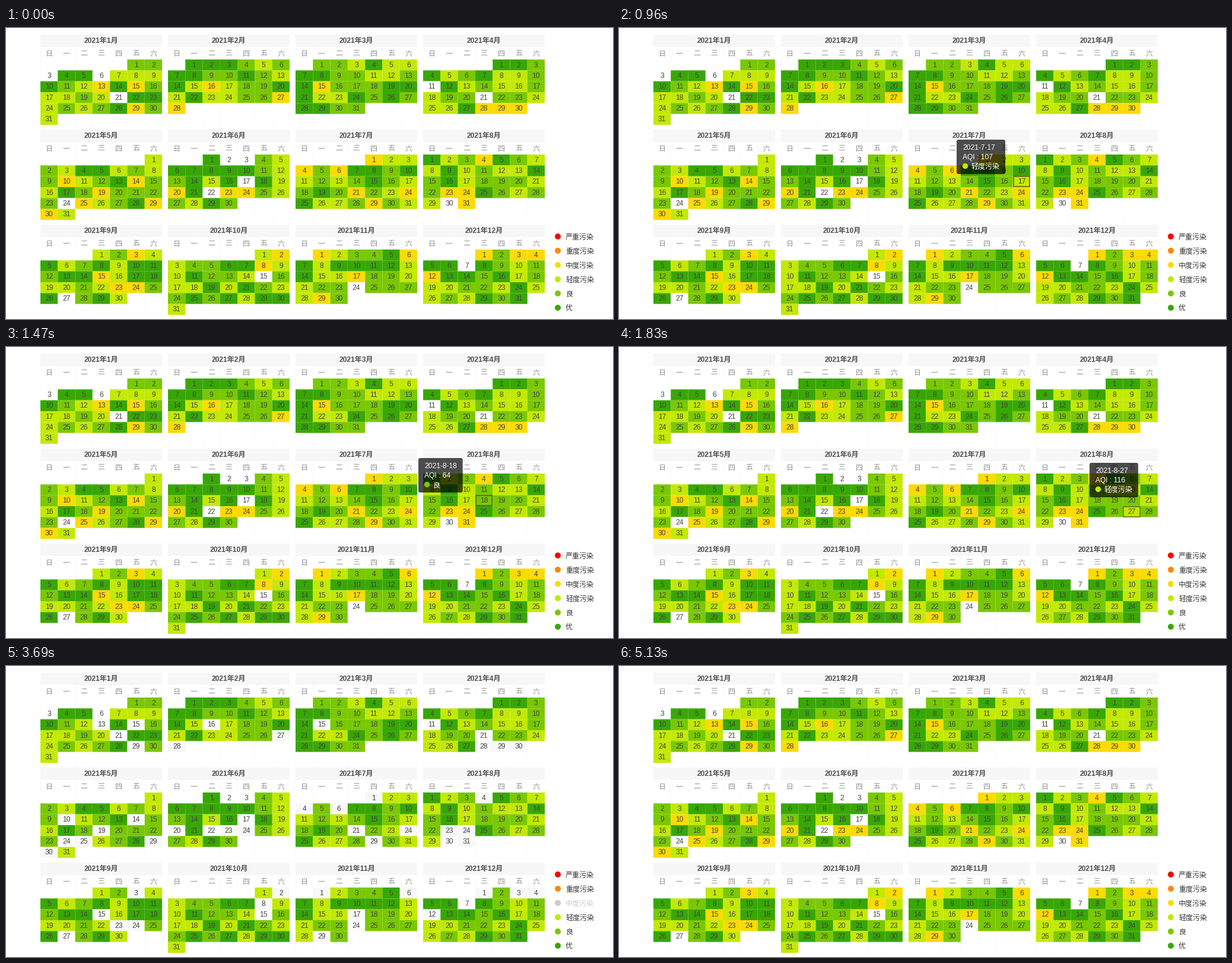
Write a matplotlib script that moves like this. It is 1023 by 490 pixels and loops after 5.76 s.

```python
import numpy as np
import matplotlib.pyplot as plt
from matplotlib.animation import FuncAnimation
from matplotlib.patches import Circle, FancyBboxPatch, Rectangle

W, H, DPI = 1023, 490, 64
STEP, LOOP = 30, 5760
PX = 72 / DPI  # points per pixel
CELL_W, CELL_H = 205 / 7, 110 / 6

plt.rcParams["font.family"] = ["Liberation Sans", "Noto Sans CJK JP"]

# grade letter -> (name, colour, lowest index), worst first
GRADES = {
    "S": ("严重污染", "#fc0003", 301),
    "H": ("重度污染", "#ff8800", 201),
    "M": ("中度污染", "#fbdb00", 151),
    "L": ("轻度污染", "#c3e900", 102),
    "G": ("良", "#79c800", 54),
    "E": ("优", "#38a703", 22),
}
NO_DATA, OFF_CELL, OFF_MARK = "#ffffff", "#f8f8f8", "#cccccc"

# daily grades of the year, one word per calendar week, "-" where no reading
MONTHS = [
    "GG -EE-LLL EGLMEMG LLGL-EE LGLGEMG L",
    "EEEGLG EEGGEGL ELMLGGE LELLGGM M",
    "GGLELL EEGGLLG EMGGGEE ELLEGEG EEGG",
    "EEG ELGELLG -ELGLLG LGG-GGL LLEMMM",
    "L GLEELGL GMLGEMG LEGMGGG G-MLGEM ML",
    "E--GL EEEEEGL GELE-EL ME-MMGL GLEG",
    "MLL MGMEEGE LGLGEGL GEGMGLM ELLGMGL",
    "ELGMEGL LELGLLE GELGGGL GMMEGLG L-M",
    "LGML ELGELEE GEEMLEE LLGLMMG E-GEL",
    "LM LGGEEML LEGGL-G LLELEGL GEGELEE L",
    "MLGGEM ELEEEEL ELLMGGL LGG-GGG LMG",
    "MGMM EE-EGLG MEEGELG LLGGLEL LGLEGE",
]
DAYS = [m.replace(" ", "") for m in MONTHS]
FIRST = [(5 + sum(len(d) for d in DAYS[:m])) % 7 for m in range(12)]

# pointer key points: ms, x, y
POINTER = np.array([
    (150, 620, 240), (210, 678, 240), (360, 678, 277), (450, 678, 277),
    (510, 864, 277), (570, 561, 259), (870, 561, 259), (960, 678, 259),
    (1200, 678, 259), (1470, 793, 259), (1650, 835, 259), (1830, 864, 277),
])
HOVER_START, HOVER_END = 150, 1860
FOLLOW = 0.15  # share of the way the tooltip covers per step
READINGS = {"2021-7-24": 151, "2021-7-17": 107, "2021-8-18": 64}
# legend switches: (start ms, end ms, grade)
SWITCHED = [(2730, 3150, "H"), (3690, 4200, "M"), (4620, 5130, "L")]

fig = plt.figure(figsize=(W / DPI, H / DPI), dpi=DPI, facecolor="white")
ax = fig.add_axes([0, 0, 1, 1], zorder=1)


def reset_axes():
    ax.clear()
    ax.set(xlim=(0, W), ylim=(H, 0))
    ax.axis("off")


def label(x, y, s, color="#444444", size=12, **kw):
    return ax.text(x, y, s, color=color, fontsize=size * PX, va="baseline", **kw)


def box(x, y, w, h, color, **kw):
    return ax.add_patch(Rectangle((x, y), w, h, facecolor=color, **kw))


def corner(month):
    return 58 + 215 * (month % 4), 11 + 160 * (month // 4)


def cell_pos(month, day):
    x, y = corner(month)
    row, col = divmod(FIRST[month] + day - 1, 7)
    return x + col * CELL_W, y + 42 + row * CELL_H


def day_at(x, y):
    """Month index and day under a point, gaps going to the nearest block."""
    month = int((x - 53) // 215 + 4 * ((y - 6) // 160))
    left, top = corner(month)
    col = int(np.clip((x - left) // CELL_W, 0, 6))
    row = int((y - top - 42) // CELL_H)
    return month, 7 * row + col - FIRST[month] + 1


def draw_month(month, hidden):
    x, y = corner(month)
    box(x, y, 205, 21, "#f7f7f7", lw=0)
    label(x + 102.5, y + 14, f"2021年{month + 1}月", "#505050",
          ha="center", weight="bold")
    for col, name in enumerate("日一二三四五六"):
        left = x + col * CELL_W
        ax.plot([left, left], [y + 21, y + 152], color="#fafafa", lw=PX)
        label(left + CELL_W / 2, y + 35.5, name, "#909090", ha="center")
    for day, grade in enumerate(DAYS[month], 1):
        cx, cy = cell_pos(month, day)
        color = NO_DATA if grade == "-" else GRADES[grade][1]
        if grade == hidden:
            color = OFF_CELL
        # unsnapped edges leave the faint seams between cells
        box(cx, cy, CELL_W, CELL_H, color, lw=0, snap=False, zorder=2.5)
        label(cx + CELL_W / 2, cy + 12.7, str(day), ha="center")


def draw_legend(hidden):
    for i, (grade, (name, color, _)) in enumerate(GRADES.items()):
        y = 351 + 24 * i
        off = grade == hidden
        ax.add_patch(Circle((930, y), 5, color=OFF_MARK if off else color, lw=0))
        label(943, y + 4.5, name, OFF_MARK if off else "#333333")


def snapshot(hidden):
    """Draw the whole calendar once and keep it as a backdrop."""
    reset_axes()
    for month in range(12):
        draw_month(month, hidden)
    draw_legend(hidden)
    fig.canvas.draw()
    return np.array(fig.canvas.buffer_rgba())


def tip_width(date, name):
    return 20 + max(6.67 * (len(date) - 2) + 8, 14 + 12 * len(name))


def follow_pointer():
    """Hovered day and lagging tooltip corner for every step of the hover."""
    track, pos = {}, None
    for t in range(HOVER_START, HOVER_END, STEP):
        px, py = (np.interp(t, POINTER[:, 0], POINTER[:, k]) for k in (1, 2))
        month, day = day_at(px, py)
        date, name = f"2021-{month + 1}-{day}", GRADES[DAYS[month][day - 1]][0]
        cx, cy = cell_pos(month, day)
        goal = np.array([cx + (CELL_W - tip_width(date, name)) / 2, cy - 63])
        pos = goal if pos is None else pos + FOLLOW * (goal - pos)
        track[t] = month, day, date, np.round(pos)
    return track


backdrops = {g: snapshot(g) for g in (None, "H", "M", "L")}
track = follow_pointer()
reset_axes()
backdrop = fig.figimage(backdrops[None], origin="upper", zorder=-1)

frame_mark = box(0, 0, CELL_W - 2, CELL_H - 1.5, "none",
                 edgecolor=(0.2, 0.2, 0.1, 0.55), lw=2 * PX)
panel = ax.add_patch(FancyBboxPatch(
    (0, 0), 1, 1, boxstyle="round,pad=0,rounding_size=3",
    facecolor="black", alpha=0.7, lw=0, zorder=3))
dot = ax.add_patch(Circle((0, 0), 4.7, lw=0, zorder=4))
lines = [label(0, 0, "", "white", zorder=4) for _ in range(3)]
tip = [frame_mark, panel, dot, *lines]


def show_tip(month, day, date, pos):
    name, color, lowest = GRADES[DAYS[month][day - 1]]
    index = READINGS.get(date, lowest + day * 7 % 25)
    cx, cy = cell_pos(month, day)
    frame_mark.set_xy((cx + 1, cy + 0.8))

    x, y = pos
    panel.set_bounds(x, y, tip_width(date, name), 58)
    dot.center = (x + 14.5, y + 44.5)
    dot.set_facecolor(color)
    for i, (line, s) in enumerate(zip(lines, (date, f"AQI : {index}", name))):
        line.set_text(s)
        line.set_position((x + (24 if i == 2 else 10), y + 17 + 16 * i))


def update(i):
    t = i * STEP
    hidden = next((g for a, b, g in SWITCHED if a <= t < b), None)
    backdrop.set_data(backdrops[hidden])
    for artist in tip:
        artist.set_visible(t in track)
    if t in track:
        show_tip(*track[t])
    return [backdrop, *tip]


anim = FuncAnimation(fig, update, frames=LOOP // STEP, interval=STEP,
                     repeat=True, repeat_delay=0, blit=False)
plt.show()
```
